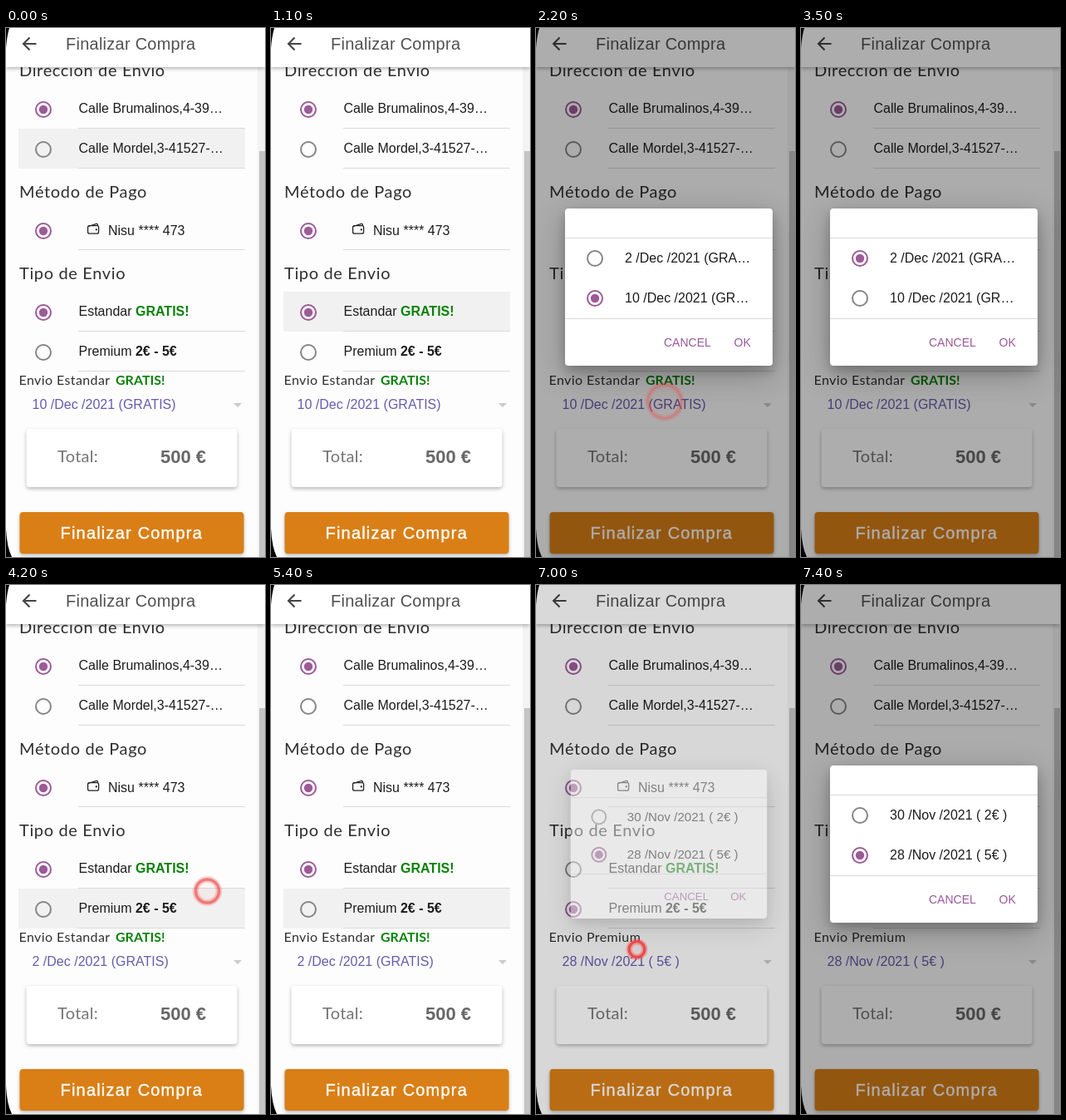
An HTML page for the animation above (8000 ms loop, 312 by 636 pixels).

```html
<!DOCTYPE html>
<html lang="es">
<head>
<meta charset="utf-8">
<style>
  html, body { margin: 0; height: 100%; overflow: hidden; background: #fff; }
  svg { display: block; width: 312px; height: 636px; font: 16px "Liberation Sans", Arial, sans-serif; fill: #1c1c1c; }
  .h { font: 20px Lato, sans-serif; letter-spacing: .65px; fill: #303030; }
  .s { font: 16px Lato, sans-serif; letter-spacing: .4px; fill: #303030; }
  .free { font-weight: bold; fill: #0a820a; }
  .b { font-weight: bold; }
  .rule { stroke: #dadada; }
  .btn { font-size: 14px; fill: #98599a; }
  .card { filter: drop-shadow(0 2px 2px rgba(0,0,0,.28)); }
  #box { filter: drop-shadow(0 6px 7px rgba(0,0,0,.2)) drop-shadow(0 10px 18px rgba(0,0,0,.24)); }
</style>
</head>
<body>
<svg viewBox="0 0 312 636">
  <rect width="312" height="636" fill="#fdfdfd"/>
  <rect id="hover" x="15" width="273" height="48" fill="#f1f1f1"/>
  <clipPath id="row"><rect x="15" y="365" width="273" height="48"/></clipPath>
  <circle id="ripple" cx="99" cy="404" clip-path="url(#row)"/>

  <g class="h">
    <text x="16" y="58">Direccion de Envio</text>
    <text x="16" y="204">Método de Pago</text>
    <text x="16" y="302">Tipo de Envio</text>
  </g>
  <path class="rule" d="M87 120.5H288M87 168.5H288M87 266.5H288M87 364.5H288M87 412.5H288"/>
  <text x="87.5" y="102">Calle Brumalinos,4-39…</text>
  <text x="87.5" y="150">Calle Mordel,3-41527-…</text>
  <text x="123" y="249">Nisu **** 473</text>
  <text x="87.5" y="346">Estandar <tspan class="free">GRATIS!</tspan></text>
  <text x="87.5" y="394">Premium <tspan class="b">2€ - 5€</tspan></text>
  <g fill="none" stroke="#222" stroke-width="1.3">
    <rect x="98.6" y="237.6" width="13" height="9.6" rx="2"/>
    <path d="M99 238.5L109 235.4Q110.5 235.2 110.5 237.5"/>
    <circle cx="108.8" cy="242.4" r=".5"/>
  </g>
  <g id="radios"></g>

  <text class="s" x="15.5" y="429"><tspan id="kind"></tspan><tspan id="free" class="free" x="132" letter-spacing="0">GRATIS!</tspan></text>
  <text id="date" x="31.5" y="458" fill="#665cb0"></text>
  <path d="M274 451h10l-5 5z" fill="#c9c9d2"/>

  <rect class="card" x="24.5" y="482" width="254" height="70" rx="4" fill="#fff"/>
  <text x="62" y="522" fill="#757575" style="font:20px Lato,sans-serif;letter-spacing:.3px">Total:</text>
  <text x="186" y="523" class="b" font-size="22" fill="#686868">500 €</text>
  <rect class="card" x="16.5" y="582" width="270" height="50" rx="4" fill="#d97f16"/>
  <text x="65.5" y="614" font-size="20" letter-spacing="1.2" fill="#fff" stroke="#fff" stroke-width=".4">Finalizar Compra</text>

  <rect x="303" y="47" width="9" height="589" fill="#f3f3f3"/>
  <rect x="305" y="148" width="7" height="488" fill="#c4c4c4"/>

  <rect class="card" width="312" height="47" fill="#fff"/>
  <path d="M36.5 19H21.5M28.5 11.5L21 19L28.5 26.5" fill="none" stroke="#444" stroke-width="2.1"/>
  <text x="72" y="26" font-size="20" letter-spacing=".25" fill="#505050">Finalizar Compra</text>
  <path d="M0 0H4Q1 10 0 24ZM0 602Q1 624 7 636H0Z" fill="#000"/>

  <rect id="shade" width="312" height="636" fill="#000"/>
  <g id="dialog">
    <rect id="box" x="35" y="217" width="250" height="189" rx="4" fill="#fff"/>
    <path class="rule" d="M35 252.5H285M35 349.5H285"/>
    <g id="choices"></g>
    <text id="first" x="107" y="282"></text>
    <text id="second" x="107" y="330"></text>
    <text class="btn" x="154" y="383">CANCEL</text>
    <text class="btn" x="238.5" y="383">OK</text>
  </g>
  <g id="ring" fill="#f33" fill-opacity=".06" stroke="#f04848">
    <circle stroke-width="7.5" stroke-opacity=".35"/>
    <circle stroke-width="3.4" fill="none"/>
  </g>
</svg>
<script>
const $ = id => document.getElementById(id);
const clamp = x => Math.max(0, Math.min(1, x));
const ramp = (t, start, len) => { const s = clamp((t - start) / len); return s * s * (3 - 2 * s); };
const set = (el, attrs) => { for (const k in attrs) el.setAttribute(k, attrs[k]); };
const write = (id, s) => { if ($(id).textContent !== s) $(id).textContent = s; };

function radio(parent, x, y) {
  const [ring, dot] = [0, 1].map(() => {
    const c = document.createElementNS("http://www.w3.org/2000/svg", "circle");
    set(c, { cx: x, cy: y });
    return $(parent).appendChild(c);
  });
  set(ring, { r: 9, fill: "none", "stroke-width": 2 });
  set(dot, { fill: "#9c5a98" });
  return on => {
    set(ring, { stroke: on > .5 ? "#9c5a98" : "#858585" });
    set(dot, { r: 5.2 * on });
  };
}
const [home, other, card, standard, premium] = [98, 146, 244, 342, 390].map(y => radio("radios", 45, y));
const [choice1, choice2] = [277, 325].map(y => radio("choices", 71, y));
home(1); other(0); card(1);

// start, x, y
const clicks = [[1.9, 155, 449], [2.98, 150, 278], [4.03, 242.5, 368], [5.92, 99, 404], [6.93, 121.5, 438]];
const ringLife = .46;
// start, end, top of the hovered row
const hovers = [[0, .15, 121], [1.05, 1.35, 317], [1.35, 1.88, 365], [4.05, 6.6, 365]];

function draw(t) {
  const hover = hovers.find(h => t >= h[0] && t < h[1]);
  set($("hover"), { y: hover ? hover[2] : 0, opacity: hover ? 1 : 0 });
  set($("ripple"), { r: 200 * ramp(t, 5.88, .25), opacity: .17 * (1 - ramp(t, 6.55, .2)) });

  const paid = t >= 5.95, sw = ramp(t, 5.92, .15);
  standard(1 - sw); premium(sw);
  write("kind", paid ? "Envio Premium" : "Envio Estandar");
  set($("free"), { opacity: paid ? 0 : 1 });
  write("date", paid ? "28 /Nov /2021 ( 5€ )" : t < 4.05 ? "10 /Dec /2021 (GRATIS)" : "2 /Dec /2021 (GRATIS)");

  const open = t < 4.5 ? ramp(t, 1.95, .15) - ramp(t, 4.02, .15) : ramp(t, 6.93, .15);
  const k = .9 + .1 * open;
  set($("shade"), { opacity: .32 * open });
  set($("dialog"), { opacity: open, transform: `translate(160 311.5) scale(${k}) translate(-160 -311.5)` });
  write("first", paid ? "30 /Nov /2021 ( 2€ )" : "2 /Dec /2021 (GRA…");
  write("second", paid ? "28 /Nov /2021 ( 5€ )" : "10 /Dec /2021 (GR…");
  const pick = paid ? 0 : ramp(t, 3.02, .15);
  choice1(pick); choice2(1 - pick);

  const click = clicks.find(c => t >= c[0] && t < c[0] + ringLife);
  set($("ring"), { opacity: 0 });
  if (click) {
    const age = t - click[0];
    set($("ring"), { opacity: clamp((ringLife - age) / .4), transform: `translate(${click[1]} ${click[2]})` });
    for (const c of $("ring").children) set(c, { r: 6 + 47 * age });
  }
}
function tick() {
  draw(performance.now() / 1000 % 8);
  requestAnimationFrame(tick);
}
tick();
</script>
</body>
</html>
```
